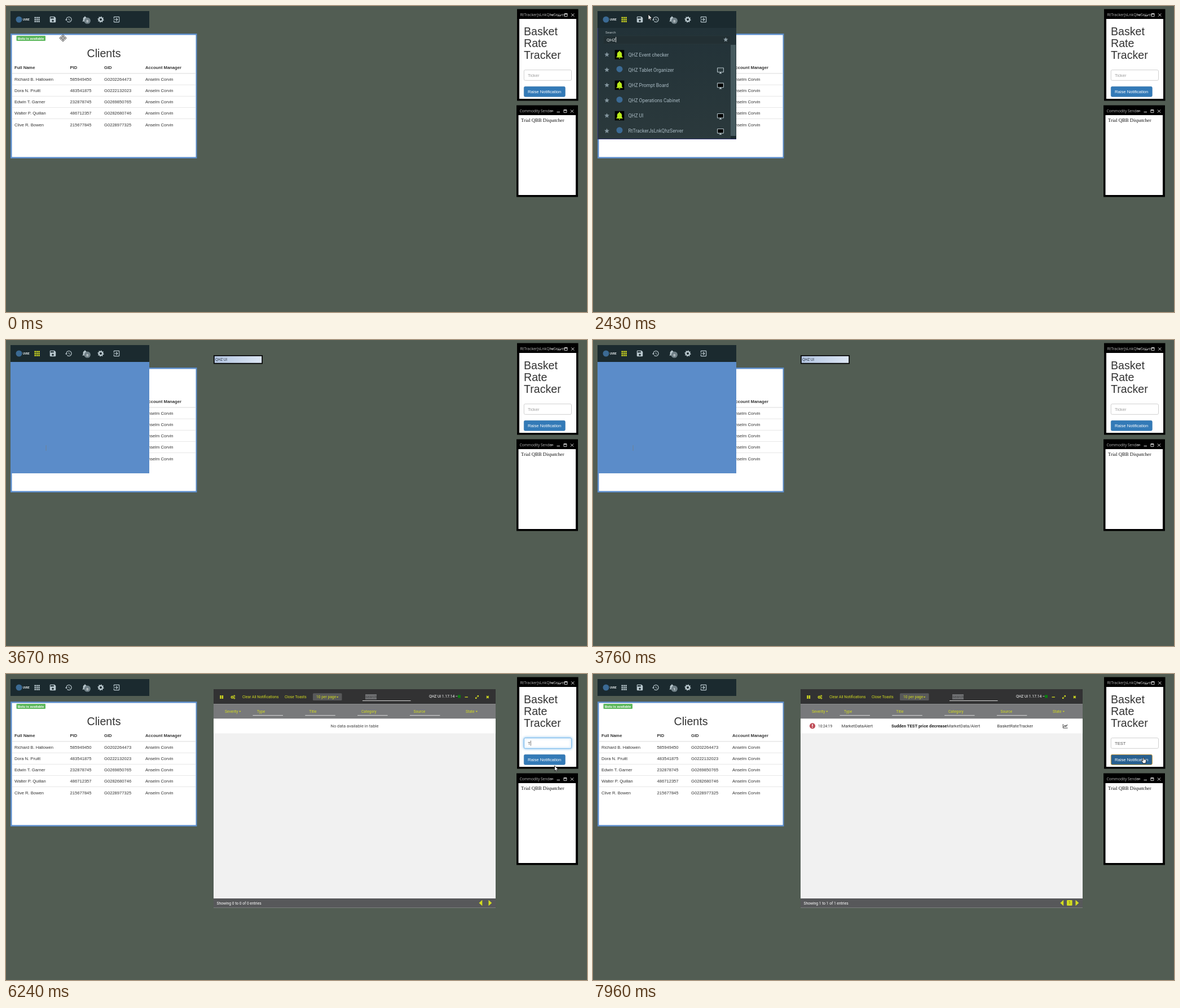
An HTML page with a canvas that plays this animation: 1030 by 544 pixels, repeating every 8 s.

```html
<!DOCTYPE html>
<html lang="en">
<head>
<meta charset="utf-8">
<title>Desktop demo</title>
<style>
html, body { margin: 0; width: 100%; height: 100%; overflow: hidden; background: #525d53; }
canvas { display: block; width: 1030px; height: 544px; }
</style>
</head>
<body>
<canvas id="stage" width="1030" height="544"></canvas>
<script>
const ctx = document.getElementById('stage').getContext('2d');
const LOOP = 8000;
const SANS = '"Liberation Sans", Arial, sans-serif';
const UI = 'Roboto, sans-serif';
const CAPTION = '"Open Sans", sans-serif';
const SERIF = '"Liberation Serif", serif';
const YELLOW = '#d3dc20', PALE = '#b9c8ce', BLUE = '#5b8cc9', LOGO = '#3b6a94';

const ICONS = {
  save: 'M17 3H5c-1.1 0-2 .9-2 2v14c0 1.1.9 2 2 2h14c1.1 0 2-.9 2-2V7l-4-4zm-5 16c-1.7 0-3-1.3-3-3s1.3-3 3-3 3 1.3 3 3-1.3 3-3 3zm3-10H5V5h10v4z',
  history: 'M13 3c-5 0-9 4-9 9H1l4 4 4-4H6c0-3.9 3.1-7 7-7s7 3.1 7 7-3.1 7-7 7c-1.9 0-3.7-.8-4.9-2.1l-1.4 1.4C8.3 20 10.5 21 13 21c5 0 9-4 9-9s-4-9-9-9zm-1 5v5l4.3 2.5.7-1.2-3.5-2V8z',
  bell: 'M12 22c1.1 0 2-.9 2-2h-4c0 1.1.9 2 2 2zm6-6v-5c0-3.1-1.6-5.6-4.5-6.3V4c0-.8-.7-1.5-1.5-1.5s-1.5.7-1.5 1.5v.7C7.6 5.4 6 7.9 6 11v5l-2 2v1h16v-1z',
  exit: 'M10 15.6L11.5 17l5-5-5-5L10 8.4 12.7 11H3v2h9.7zM19 3H5c-1.1 0-2 .9-2 2v4h2V5h14v14H5v-4H3v4c0 1.1.9 2 2 2h14c1.1 0 2-.9 2-2V5c0-1.1-.9-2-2-2z',
  star: 'M12 17.3L18.2 21l-1.7-7L22 9.2l-7.2-.6L12 2 9.2 8.6 2 9.2 7.5 14l-1.7 7z',
  screen: 'M21 2H3c-1.1 0-2 .9-2 2v12c0 1.1.9 2 2 2h7v2H8v2h8v-2h-2v-2h7c1.1 0 2-.9 2-2V4c0-1.1-.9-2-2-2zm0 14H3V4h18z',
  arrow: 'M0 0V10.2L2.4 8 4 11.6 5.6 10.9 4 7.4H7.2z',
  hand: 'M-1.1 .8Q0-.7 1 .8V4.2L4 4.8Q5.2 5.2 5 6.6L4.3 9.6V11.6H-1.6V10L-4.2 6.6Q-4 5.2-2.6 6L-1.1 7.3z'
};
for (const key in ICONS) ICONS[key] = new Path2D(ICONS[key]);

function rect(x, y, w, h, fill) { ctx.fillStyle = fill; ctx.fillRect(x, y, w, h); }

function box(x, y, w, h, r, fill, stroke, width = 0.6) {
  ctx.beginPath();
  ctx.roundRect(x, y, w, h, r);
  if (fill) { ctx.fillStyle = fill; ctx.fill(); }
  if (stroke) { ctx.strokeStyle = stroke; ctx.lineWidth = width; ctx.stroke(); }
}

function disc(x, y, r, fill) {
  ctx.beginPath(); ctx.arc(x, y, r, 0, 7); ctx.fillStyle = fill; ctx.fill();
}

// Points are flat x, y pairs.
function line(color, width, ...p) {
  ctx.beginPath();
  for (let i = 0; i < p.length; i += 2) ctx.lineTo(p[i], p[i + 1]);
  ctx.strokeStyle = color; ctx.lineWidth = width; ctx.stroke();
}

function shape(color, ...p) {
  ctx.beginPath();
  for (let i = 0; i < p.length; i += 2) ctx.lineTo(p[i], p[i + 1]);
  ctx.fillStyle = color; ctx.fill();
}

function text(s, x, mid, size, color, font = UI, weight = 400, align = 'left') {
  ctx.font = `${weight} ${size}px ${font}`;
  ctx.textAlign = align;
  ctx.fillStyle = color;
  ctx.fillText(s, x, mid + size * 0.36);
}

function icon(name, x, y, size, color) {
  ctx.save();
  ctx.translate(x - size / 2, y - size / 2);
  ctx.scale(size / 24, size / 24);
  ctx.fillStyle = color;
  ctx.fill(ICONS[name], 'evenodd');
  ctx.restore();
}

function gear(x, y, r, color, hole) {
  ctx.beginPath();
  for (let i = 0; i < 32; i++) {
    const a = (i + 0.5) * Math.PI / 16, d = i % 4 < 2 ? r : r * 0.76;
    ctx.lineTo(x + d * Math.cos(a), y + d * Math.sin(a));
  }
  ctx.fillStyle = color; ctx.fill();
  disc(x, y, r * 0.36, hole);
}

function cross(x, y, r, color, width) {
  line(color, width, x - r, y - r, x + r, y + r);
  line(color, width, x - r, y + r, x + r, y - r);
}

function caret(x, y) { shape(YELLOW, x, y - 1, x + 3.6, y - 1, x + 1.8, y + 1); }

function tooltip(s, x, w) {
  box(x, 18, w, 13.5, 1.5, YELLOW);
  text(s, x + w / 2, 25, 6.9, '#39431c', UI, 400, 'center');
}

function toolbar(t) {
  const open = t >= 840 && t < 4140;
  const recent = t >= 2570 && t < 2720;
  rect(8, 9, 246, 30, '#1b2a2f');
  disc(23, 24, 5.5, LOGO);
  text('UVRE', 30, 24.2, 4.6, '#e4eaec', UI, 700);
  for (let i = 0; i < 9; i++)
    rect(50.5 + i % 3 * 3.4, 19.5 + Math.floor(i / 3) * 3.4, 2.5, 2.5, open ? YELLOW : PALE);
  icon('save', 83, 24, 14, PALE);
  icon('history', 111, 24, 13.6, recent ? YELLOW : PALE);
  icon('bell', 140, 23.5, 13.5, PALE);
  disc(144.3, 26.2, 5.6, '#718188');
  text(t >= 7960 ? '1' : '0', 144.3, 26.4, 6, '#fff', UI, 500, 'center');
  gear(168, 24, 5.6, PALE, '#1b2a2f');
  icon('exit', 196, 24, 14, PALE);
  if (t >= 840 && t < 1400) tooltip('Applications', 67, 50);
  if (recent) tooltip('Recent Apps', 123, 59);
}

const CLIENTS = [
  ['Richard B. Hallowen', '585949450', 'G0202264473'],
  ['Dora N. Pruitt', '483541875', 'G0222132023'],
  ['Edwin T. Garner', '232878745', 'G0269850765'],
  ['Walter P. Quillan', '486712357', 'G0282680746'],
  ['Clive R. Bowen', '215677845', 'G0228977325']
];

function clientsWindow() {
  const columns = [15, 113.5, 174, 247];
  rect(8, 49, 330.5, 222, BLUE);
  rect(10.5, 51.5, 326, 217, '#fff');
  box(18.5, 53, 51.5, 9, 1.2, '#5cb85c');
  text('Bolu is available', 44.2, 57.4, 5.9, '#fff', SANS, 700, 'center');
  text('Clients', 173.5, 84, 19.6, '#333', SANS, 400, 'center');
  ['Full Name', 'PID', 'GID', 'Account Manager'].forEach((s, i) =>
    text(s, columns[i], 109.7, 7.62, '#333', SANS, 700));
  rect(10.5, 119.3, 326, 1.1, '#ddd');
  CLIENTS.forEach((row, r) => {
    const y = 130.2 + r * 20.15;
    [...row, 'Anselm Corvin'].forEach((s, i) => text(s, columns[i], y, 7.62, '#333', SANS));
    if (r < 4) rect(10.5, y + 9.6, 326, 0.6, '#d8d8d8');
  });
}

function frameButtons(x, y) {
  rect(x - 27, y + 1, 5.5, 1, '#ddd');
  box(x - 14.6, y - 2.4, 5, 4.8, 0, null, '#ddd', 0.9);
  rect(x - 14.6, y - 2.6, 5, 1.5, '#ddd');
  cross(x, y, 2.6, '#ddd', 1);
}

function monitorWindow(t, pointer) {
  rect(906, 5.5, 108.5, 163, '#000');
  rect(910, 23, 101, 142, '#fff');
  text('RtTrackerJsLnkQhzServer', 911.5, 16, 6.9, '#b5b5b5', CAPTION);
  rect(965.5, 15.5, 5.5, 0.9, '#ddd');
  frameButtons(1004.7, 16);
  ['Basket', 'Rate', 'Tracker'].forEach((s, i) => text(s, 918, 44.6 + i * 21.4, 19.6, '#333', SANS));

  const focused = t >= 5400 && t < 7800;
  ctx.save();
  if (focused) { ctx.shadowColor = '#66afe9'; ctx.shadowBlur = 4; }
  box(918.3, 113.7, 84.2, 18.6, 2.2, '#fff', focused ? '#66afe9' : '#c4c4c4', 0.8);
  ctx.restore();
  const typed = 'TEST'.slice(0, [6240, 6310, 6480, 6630].filter(k => t >= k).length);
  text(typed || 'Ticker', 925, 123, 7.62, typed ? '#555' : '#999', SANS);
  if (focused && t < 7100) {
    const x = 925 + (typed ? ctx.measureText(typed).width : 0);
    rect(x + 0.2, 118.5, 0.7, 9, '#333');
  }

  const pressed = t >= 7800;
  const hot = pressed || overButton(pointer);
  box(918.3, 143.3, 73, 18, 2.2, hot ? '#286090' : '#337ab7', pressed ? '#c39536' : '#2e6da4', pressed ? 1 : 0.6);
  text('Raise Notification', 954.7, 152.5, 7.62, '#fff', SANS, 400, 'center');
}

function publisherWindow() {
  rect(905, 176.5, 109, 163, '#000');
  rect(908.5, 194, 101.5, 142, '#fff');
  text('Commodity Sender', 910.5, 187, 6.6, '#b5b5b5', CAPTION);
  rect(965, 186.5, 5.5, 0.8, '#ccc');
  frameButtons(1003.5, 187);
  text('Trial QBB Dispatcher', 913, 203, 8.71, '#111', SERIF);
}

function appIcon(kind, x, y) {
  const green = '#9db51f';
  if (kind === 'logo') return disc(x, y - 1.5, 5.5, LOGO);
  if (kind === 'bell') {
    rect(x - 8.3, y - 8.3, 16.6, 16.6, '#000');
    return icon('bell', x, y, 17, '#b8ea1b');
  }
  box(x - 7.5, y - 7.5, 15, 15, 2, null, green, 1);
  if (kind === 'list') {
    for (const d of [-4, 0, 4]) {
      box(x - 5, y + d - 1.2, 2.6, 2.4, 0.5, null, green, 0.8);
      line(green, 0.9, x, y + d - 0.8, x + 5, y + d - 0.8);
      line(green, 0.9, x, y + d + 1, x + 4, y + d + 1);
    }
  } else {
    box(x - 4.3, y - 4, 3, 3, 1.5, null, green, 0.9);
    line(green, 0.9, x - 5.5, y + 3.8, x - 4.5, y + 0.8, x - 1, y + 0.8, x, y + 3.8);
    line(green, 0.9, x + 1.5, y - 3, x + 5, y - 3);
    line(green, 0.9, x + 1.5, y, x + 5, y);
    if (kind === 'person') box(x - 2.5, y - 8.6, 5, 2.2, 0.8, '#26363a', green, 0.9);
    else {
      box(x - 1, y + 1.2, 9, 6.5, 1, '#26363a', green, 1);
      line(green, 0.9, x - 1, y + 4, x + 8, y + 4);
    }
  }
}

function linkIcon(x, y) {
  ctx.save();
  ctx.translate(x, y);
  ctx.rotate(-Math.PI / 4);
  box(-4.2, -1.7, 5, 3.4, 1.7, null, '#a9bac3', 0.9);
  box(-0.8, -1.7, 5, 3.4, 1.7, null, '#a9bac3', 0.9);
  ctx.restore();
}

const ALL_APPS = [
  ['Getting Started', 'logo'], ['Client List', 'list'], ['Client List', 'list', 107],
  ['Client list - MQF', 'person'], ['Client list - MQF', 'person', 128],
  ['Client Portfolio', 'folio'], ['', 'folio']
];
const FOUND_APPS = [
  ['QHZ Event checker', 'bell'], ['QHZ Tablet Organizer', 'logo', '#2b3a3e'],
  ['QHZ Prompt Board', 'bell', '#000'], ['QHZ Operations Cabinet', 'logo'],
  ['QHZ UI', 'bell', '#000'], ['RtTrackerJsLnkQhzServer', 'logo', '#000']
];

function menu(t) {
  if (t >= 3500) return rect(8, 39, 246, 198, BLUE);
  ctx.save();
  ctx.beginPath();
  ctx.rect(8, 39, 246, 198);
  ctx.clip();
  const shade = ctx.createLinearGradient(0, 39, 0, 237);
  shade.addColorStop(0, '#223238');
  shade.addColorStop(1, '#2b393c');
  rect(8, 39, 246, 198, shade);

  const found = t >= 2430, editing = t >= 1730;
  const rows = found ? FOUND_APPS : ALL_APPS;
  rows.forEach(([name, kind, extra], i) => {
    const y = found ? 86.5 + i * 27.15 : 88 + i * 26.05;
    icon('star', 24.6, y - 0.3, 10.5, '#83959e');
    appIcon(kind, 47, y);
    text(name, 62.5, y, 8.5, '#a9bac3');
    if (extra && found) {
      rect(221, y - 4, 10, 7.5, extra);
      icon('screen', 226, y + 1.2, 13, '#b4c2c8');
    } else if (extra) linkIcon(extra, y);
  });

  rect(244, 69, 10, 168, '#1b292d');
  rect(244, 69, 9.3, found ? 162 : 12, found ? '#465a5f' : '#596b71');
  box(18.3, editing ? 53 : 52.3, 225.4, editing ? 14.5 : 15.4, 1, '#222f33', editing ? '#2b3a3e' : '#4c5b61');
  icon('star', 235.3, 59.7, 10, '#8b9ca4');
  if (editing) {
    text('Search', 22, 47, 6, '#b9c4c7');
    const typed = 'QHZ'.slice(0, [1950, 2070, 2180].filter(k => t >= k).length);
    text(typed, 24, 60, 8, '#e6ecee');
    if (t < 2640 || t >= 2950) rect(24.3 + ctx.measureText(typed).width, 55, 0.8, 9.5, '#fff');
  } else text('Search', 23.5, 60.2, 8, '#b9c4c7');
  rect(8, 39, 0.9, 198, '#30307f');
  rect(8, 236.2, 246, 0.8, '#30307f');
  ctx.restore();
}

function splash() {
  rect(368, 27, 87, 15.5, '#000');
  const shade = ctx.createLinearGradient(369, 0, 454, 0);
  shade.addColorStop(0, '#b4c6e2');
  shade.addColorStop(1, '#dce6f4');
  rect(369.7, 28.7, 83.6, 12.1, shade);
  text('QHZ UI', 371, 34.8, 6.3, '#1c2430', CAPTION);
}

function noticeWindow(t) {
  const size = 6.7, filled = t >= 7880;
  rect(368, 27, 500, 388.5, '#f1f1f1');
  rect(368, 27, 500, 26.3, '#323233');
  if (t < 3990) return;
  rect(368, 53.3, 500, 26.2, '#78797b');
  rect(368, 79.5, 500, 26, '#fff');
  rect(368, 399, 500, 16.5, '#57585a');

  rect(379.3, 38, 2.4, 6, YELLOW);
  rect(382.7, 38, 2.4, 6, YELLOW);
  gear(401, 41.2, 2.8, YELLOW, '#323233');
  gear(404.7, 39, 1.7, YELLOW, '#323233');
  gear(404.7, 43, 1.7, YELLOW, '#323233');
  text('Clear All Notifications', 419, 41, size, YELLOW);
  text('Close Toasts', 494, 41, size, YELLOW);
  box(544, 34.3, 51.5, 12.8, 1.5, '#58595a');
  text('10 per page', 550, 41, size, YELLOW);
  caret(585.8, 41.2);

  const active = t < 5400;
  rect(637, 36, 20, 9.2, active ? '#2b73d2' : '#707173');
  text('search', 637.3, 40.6, size, active ? '#fff' : '#47484a');
  rect(632, 47.2, 85.5, 0.8, '#fff');
  text('QHZ UI 1.17.14 –', 750, 40, size, '#fff');
  rect(801, 37.3, 5, 5.2, '#0b7d10');
  if (active) box(808, 34.3, 16.5, 12.8, 1, '#4b4b4c', '#c99a2b', 0.9);
  rect(813.5, 40.4, 5.4, 1.3, YELLOW);
  line(YELLOW, 1, 833, 43, 837, 39);
  shape(YELLOW, 838, 38, 838, 41.2, 834.8, 38);
  shape(YELLOW, 832, 44, 832, 40.8, 835.2, 44);
  cross(853.8, 41, 1.9, YELLOW, 1.5);

  text('Severity', 388, 66.6, size, YELLOW);
  caret(413, 66.8);
  ['Type', 'Title', 'Category', 'Source'].forEach((s, i) => {
    text(s, 445 + i * 92.5, 66.6, size, YELLOW);
    rect(437.5 + i * 92.8, 73.3, 53.5, 0.8, '#f2f2f2');
  });
  text('State', 815, 66.6, size, YELLOW);
  caret(832.5, 66.8);

  if (filled) {
    disc(389, 92.3, 5.1, '#bf4d58');
    rect(388.3, 89, 1.4, 4.2, '#fff');
    rect(388.3, 94.2, 1.4, 1.4, '#fff');
    text('10:24:19', 399, 92.6, 6.5, '#333');
    text('MarketDataAlert', 440.5, 92.6, 7.62, '#333');
    text('Sudden TEST price decrease', 529, 92.6, 7.62, '#222', UI, 700);
    text('MarketData/Alert', 627.5, 92.6, 7.62, '#333');
    text('BasketRateTracker', 716.5, 92.6, 7.62, '#333');
    line('#222', 0.9, 833.3, 89, 833.3, 96, 841.5, 96);
    line('#222', 1.1, 834.6, 94, 836.6, 91.7, 838.2, 93.2, 841, 90);
  } else {
    text('No data available in table', 618, 92.6, 7.62, '#444', UI, 400, 'center');
  }
  const n = filled ? 1 : 0;
  text(`Showing ${n} to ${n} of ${n} entries`, 373.5, 408, size, '#fff');
  const left = filled ? 828.3 : 838.5;
  shape(YELLOW, left, 407, left + 5.8, 401.7, left + 5.8, 412.3);
  shape(YELLOW, 861.3, 407, 855.5, 401.7, 855.5, 412.3);
  if (filled) {
    box(840, 402, 9.6, 9.8, 1.2, YELLOW);
    text('1', 844.8, 407, 6.5, '#55571c', UI, 400, 'center');
  }
}

// Each move: first step, last step, step count, end point.
const MOVES = [
  [70, 540, 7, 54, 33], [690, 690, 1, 56, 27], [1240, 1560, 5, 98, 15],
  [2570, 3030, 7, 71, 190], [4140, 4480, 5, 674.5, 116.5], [4560, 4940, 6, 914, 130],
  [5000, 5400, 6, 960, 122], [5480, 5800, 5, 972.5, 163],
  [7330, 7410, 2, 998, 162], [7490, 7650, 3, 976, 148]
];

function pointerAt(t) {
  let x = 101, y = 57;
  for (const [start, end, steps, toX, toY] of MOVES) {
    if (t < start) break;
    const k = end > start ? Math.min(steps, 1 + Math.floor((t - start) / (end - start) * (steps - 1) + 1e-6)) : 1;
    x += (toX - x) * k / steps;
    y += (toY - y) * k / steps;
  }
  return { x, y };
}

function inside(p, x, y, w, h) { return p.x > x && p.x < x + w && p.y > y && p.y < y + h; }
function overButton(p) { return inside(p, 918, 143, 73.5, 18.5); }

function drawPointer(t, p) {
  const { x, y } = p;
  if (t < 600 && y > 50) {
    for (let i = 0; i < 4; i++) {
      ctx.save();
      ctx.translate(x, y);
      ctx.rotate(i * Math.PI / 2);
      ctx.beginPath();
      for (const [px, py] of [[-0.8, -0.8], [-0.8, -3.6], [-2.4, -3.6], [0, -6.3], [2.4, -3.6], [0.8, -3.6], [0.8, -0.8]])
        ctx.lineTo(px, py);
      ctx.fillStyle = '#fff'; ctx.fill();
      ctx.strokeStyle = '#222'; ctx.lineWidth = 0.8; ctx.stroke();
      ctx.restore();
    }
    return;
  }
  if (t >= 3500 && t < 4140) return rect(70.6, 187, 0.9, 10, '#75808f');
  if (inside(p, 918, 113, 85, 19.5)) {
    rect(x - 0.4, y - 5, 0.9, 10, '#333');
    rect(x - 1.8, y - 5, 3.6, 0.7, '#333');
    return rect(x - 1.8, y + 4.4, 3.6, 0.7, '#333');
  }
  const hand = (t >= 690 && t < 1240) || (t >= 2570 && t < 3500 && y > 72) || overButton(p);
  const path = ICONS[hand ? 'hand' : 'arrow'];
  ctx.save();
  ctx.translate(x, y);
  ctx.scale(0.93, 0.93);
  ctx.fillStyle = '#fff'; ctx.fill(path);
  ctx.strokeStyle = '#111'; ctx.lineWidth = 0.9; ctx.stroke(path);
  ctx.restore();
}

function draw(t) {
  const pointer = pointerAt(t);
  rect(0, 0, 1030, 544, '#525d53');
  clientsWindow();
  toolbar(t);
  if (t >= 1000 && t < 3900) menu(t);
  if (t >= 3820) noticeWindow(t);
  else if (t >= 3350) splash();
  monitorWindow(t, pointer);
  publisherWindow();
  drawPointer(t, pointer);
}

const begin = performance.now();
function tick() {
  draw((performance.now() - begin) % LOOP);
  requestAnimationFrame(tick);
}
tick();
</script>
</body>
</html>
```
